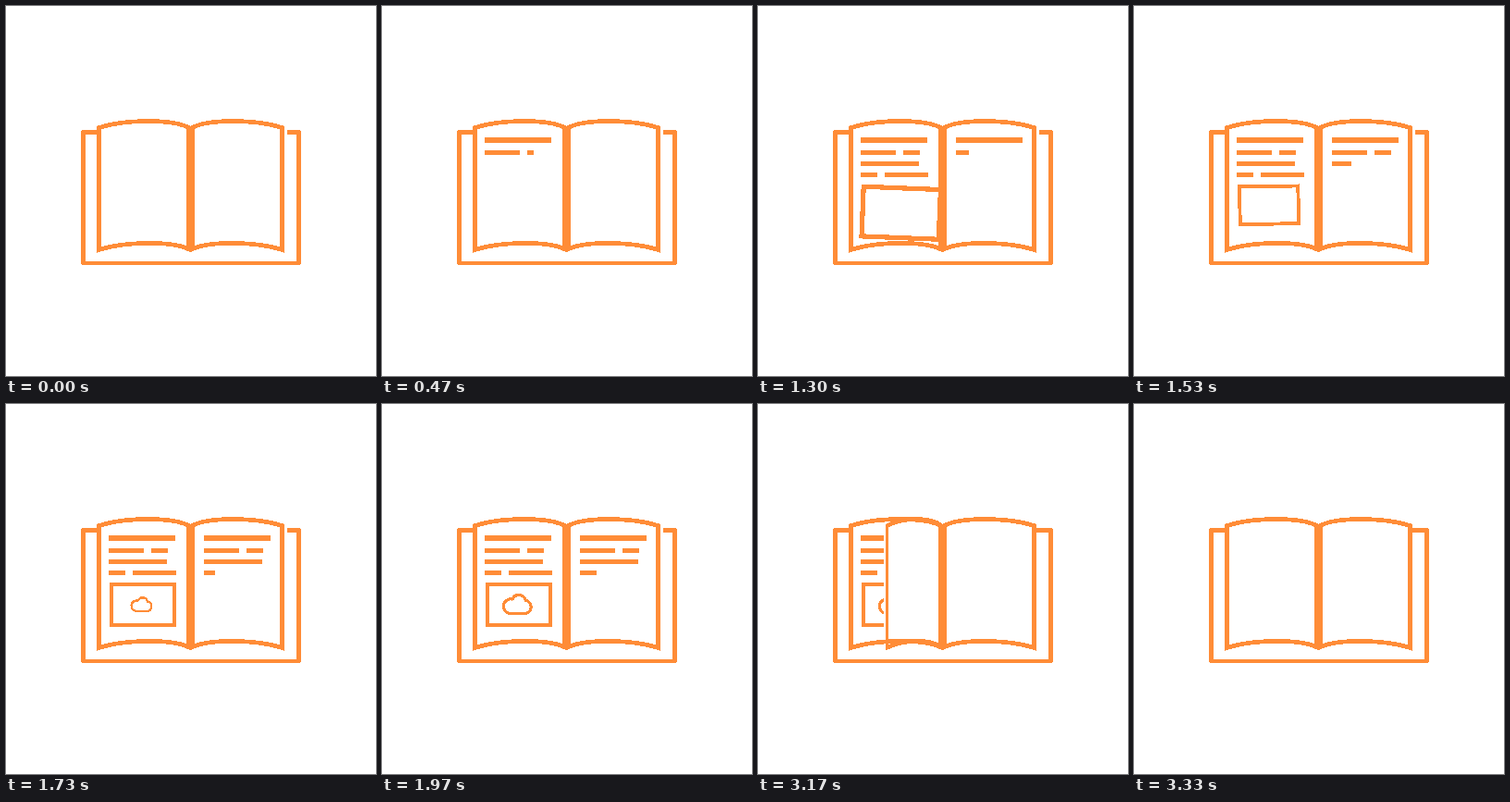
An HTML page that plays this animation: 400x400 px, repeating every 4010 ms.

```html
<!DOCTYPE html>
<html lang="en">
<head>
<meta charset="utf-8">
<title>Open book</title>
<style>
html, body { margin: 0; width: 100%; height: 100%; overflow: hidden; background: #fff; }
svg { display: block; width: 100%; height: 100%; shape-rendering: crispEdges; }
.ink { fill: none; stroke: #ff8c37; stroke-width: 4.7; }
.text { fill: #ff8c37; }
.paper { fill: #fff; stroke: #fff; stroke-width: 11; }
#cover { stroke-linejoin: round; }
#frame { stroke-width: 4.2; }
#cloud { stroke-width: 3.2; stroke-linejoin: round; }
</style>
</head>
<body>
<svg viewBox="0 0 400 400">
  <defs>
    <path id="leaf" d="M298.5 131.5 C269 122.2 219 122.2 201.5 131.5 V262.8 C219 254.2 269 254.2 298.5 263.5 Z"/>
  </defs>
  <path id="cover" class="ink" d="M100 136.5 H83.5 V278 H316.5 V136.5 H299"/>
  <g id="left">
    <path id="leftText" class="text"/>
    <rect id="frame" class="ink" width="67.6" height="43.6"/>
    <path id="cloud" class="ink" d="M139 226.5 A7.85 7.85 0 1 1 141 211 A7.6 7.6 0 0 1 155.3 212.3 A7.2 7.2 0 0 1 155 226.5 Z"/>
  </g>
  <g id="turn">
    <use href="#leaf" class="paper"/>
    <use href="#leaf" class="ink"/>
    <path id="rightText" class="text"/>
  </g>
  <use href="#leaf" class="ink" transform="matrix(-1 0 0 1 399 0)"/>
  <use href="#leaf" class="ink"/>
</svg>
<script>
const LOOP = 4010;
const SPINE = 199.5;
const GAP = 8;
const $ = id => document.getElementById(id);
const span = (t, from, length) => Math.min(1, Math.max(0, (t - from) / length));
const inOutQuad = p => p < 0.5 ? 2 * p * p : 1 - 2 * (1 - p) ** 2;
const outCubic = p => 1 - (1 - p) ** 3;

// Word widths, row by row; the right page stops one word earlier
const WORDS = [[72], [38, 18], [63], [18, 47]];

// Fills the words one after another until the given length is used up
function write(left, length) {
  let d = "";
  WORDS.forEach((row, i) => {
    const top = i ? 144 + 12 * i : 142;
    const height = i ? 5 : 6;
    let x = left;
    for (const width of row) {
      const w = Math.min(width, length);
      if (w > 0) d += `M${x} ${top}h${w}v${height}h${-w}z`;
      length -= width;
      x += width + GAP;
    }
  });
  return d;
}

// Damped swing around full size, at rest after two and a half swings
function spring(t) {
  const u = Math.min(2.5, Math.max(0, (t - 1045) / 240));
  return 1 - 0.26 ** u * Math.cos(Math.PI * u);
}

function show(el, visible) {
  el.style.display = visible ? "" : "none";
}

function draw(t) {
  const rightLength = WORDS.flat().slice(0, -1).reduce((a, b) => a + b);
  $("leftText").setAttribute("d", write(111, (t - 10) * 0.254));
  $("rightText").setAttribute("d",
    write(214, Math.min(rightLength, (t - 985) * 0.272)));

  const size = spring(t);
  show($("frame"), size > 0);
  $("frame").setAttribute("transform",
    `translate(114.2 195.2) rotate(${10 * (size - 1)}) scale(${size})`);

  const pop = outCubic(span(t, 1600, 370));
  show($("cloud"), pop > 0);
  $("cloud").setAttribute("transform",
    `translate(147 217) scale(${pop}) translate(-147 -217)`);

  const turned = span(t, 2828, 500);
  const flip = 1 - 2 * inOutQuad(turned);
  show($("left"), turned < 1);
  show($("turn"), turned < 1);
  show($("rightText"), flip > 0);
  $("turn").setAttribute("transform",
    `translate(${SPINE} 0) scale(${flip} 1) translate(${-SPINE} 0)`);
}

const start = performance.now();
function tick() {
  draw((performance.now() - start) % LOOP);
  requestAnimationFrame(tick);
}
draw(0);
requestAnimationFrame(tick);
</script>
</body>
</html>
```
